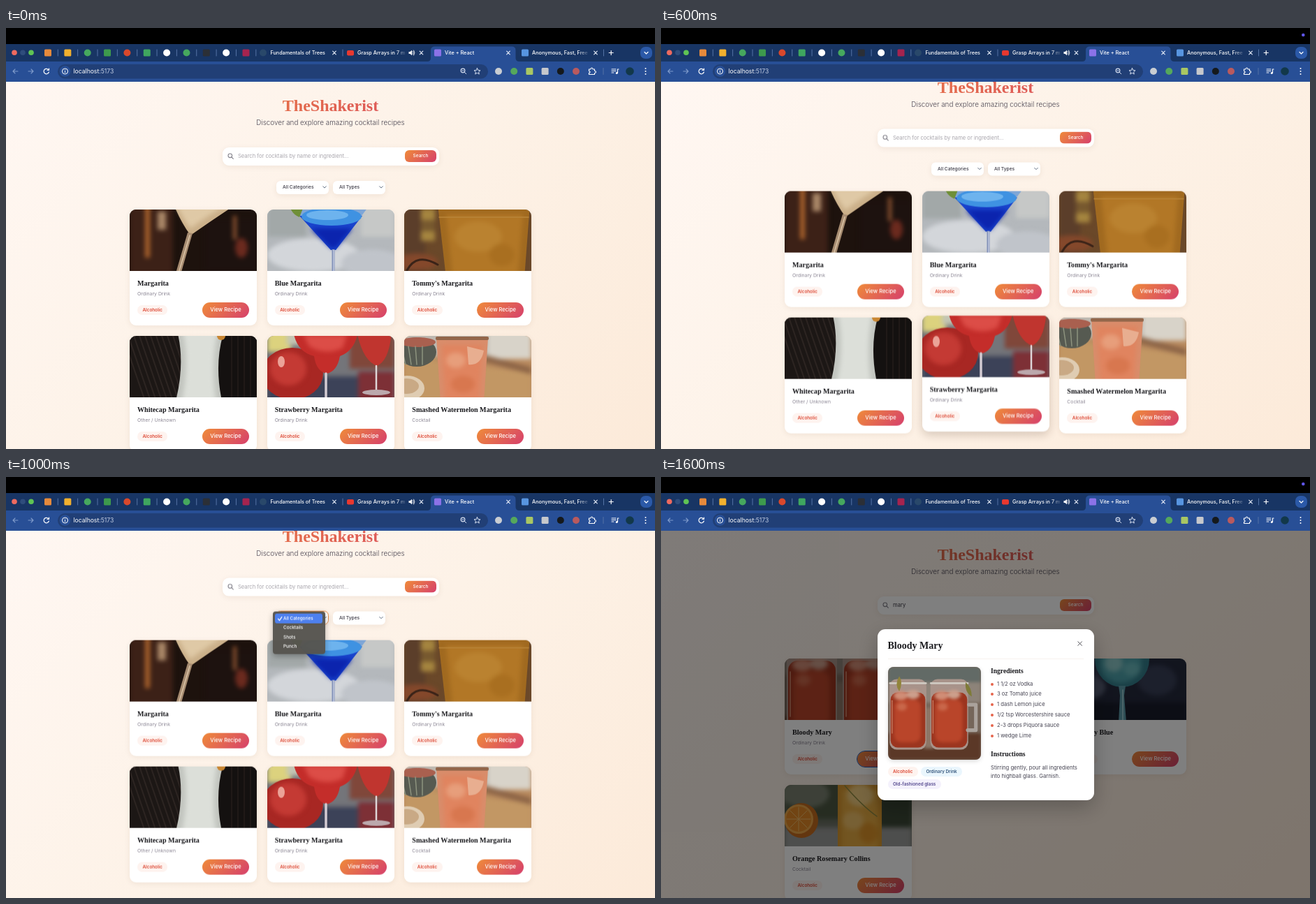
Recreate the animation shown at these times as an HTML page. Size 929 by 603 pixels, loop 1800 ms.

```html
<!DOCTYPE html>
<html lang="en">
<head>
<meta charset="utf-8">
<title>Cocktail recipes</title>
<style>
html, body { margin: 0; width: 100%; height: 100%; overflow: hidden; background: #000; }
#stage { position: relative; width: 929px; height: 603px; overflow: hidden; font-family: Inter, sans-serif; }
#stage div { position: absolute; box-sizing: border-box; }
#chrome, #dot { position: absolute; left: 0; top: 0; }
#view { left: 0; top: 77px; width: 929px; height: 526px; overflow: hidden;
  background: linear-gradient(135deg, #fff7f2, #fdf2e7 50%, #fcead9); }
#page, .shade { left: 0; top: -77px; width: 929px; height: 640px; }
#page { animation: scroll 1.8s step-end infinite; }
@keyframes scroll {
  0% { transform: none; }
  33.332% { transform: translateY(-26.4px); }
  77.777%, 100% { transform: none; }
}
.lift { animation: lift 1.8s step-end infinite; }
@keyframes lift {
  0% { transform: none; box-shadow: 0 2px 8px rgba(90, 50, 20, .08); }
  33.332% { transform: translateY(-2.6px); box-shadow: 0 5px 14px rgba(60, 30, 10, .2); }
  44.443%, 100% { transform: none; box-shadow: 0 2px 8px rgba(90, 50, 20, .08); }
}
.shade { background: rgba(0, 0, 0, .5); }
.t { line-height: 12px; margin-top: -6px; white-space: pre; }
.serif { font-family: "Liberation Serif", serif; font-weight: 700; color: #1a1a1e; }
.mid { left: 0; width: 929px; text-align: center; }
.logo { width: 575px; text-align: center; font-size: 24px; line-height: 32px;
  background: linear-gradient(135deg, #ed8936, #d53f6c); -webkit-background-clip: text;
  background-clip: text; color: transparent; }
.box { background: #fff; box-shadow: 0 2px 8px rgba(90, 50, 20, .08); }
.card { width: 182px; height: 166.4px; border-radius: 9px; }
.card svg { position: absolute; left: 0; top: 0; width: 182px; height: 88.4px; border-radius: 9px 9px 0 0; }
.btn { background: linear-gradient(135deg, #ef8b3a, #d6406c); color: #fff; font-weight: 500; text-align: center; }
.view { left: 104px; top: 133.3px; width: 67px; height: 22px; border-radius: 11px; font-size: 7.55px; line-height: 22px; }
.tag { font-size: 6.3px; font-weight: 600; line-height: 14.2px; height: 14.2px; border-radius: 8px;
  padding: 0 7.5px; white-space: pre; color: #dc4632; background: #fef3ef; }
.tags { left: 15px; top: 197.5px; width: 140px; display: flex; flex-wrap: wrap; gap: 4px; }
#stage .tags .tag { position: static; }
.tags .tag:nth-child(2) { color: #36587e; background: #eaf6fd; }
.tags .tag:nth-child(3) { color: #55498f; background: #f4f1fc; }
.modal { left: 309.5px; width: 310px; border-radius: 11px; background: #fff; box-shadow: 0 10px 30px rgba(0, 0, 0, .25); }
.modal svg { position: absolute; }
.modal .photo { left: 15px; top: 54px; width: 133px; height: 133px; border-radius: 8px; box-shadow: 0 2px 6px rgba(0, 0, 0, .15); }
.body { font-size: 7.65px; color: #474553; }
.bullet { width: 4px; height: 4px; border-radius: 2px; background: #e5654c; }
.ring { border: 1.4px solid #2458b4; }
.menu { width: 75px; background: rgba(86, 84, 79, .97); border-radius: 4px; box-shadow: 0 3px 9px rgba(0, 0, 0, .3); }
.menu .t { font-size: 6.4px; font-weight: 500; color: #fff; }
.pick { left: 3.5px; top: 3.5px; width: 68px; height: 13.5px; border-radius: 3px; background: #4e80ee; }
.soft { filter: blur(3px); }
</style>
</head>
<body>
<div id="stage"></div>
<script>
const STEPS = 9;

// SVG shapes
const rect = (x, y, w, h, fill, rx = 0) => `<rect x="${x}" y="${y}" width="${w}" height="${h}" rx="${rx}" fill="${fill}"/>`;
const oval = (x, y, rx, ry, fill) => `<ellipse cx="${x}" cy="${y}" rx="${rx}" ry="${ry}" fill="${fill}"/>`;
const path = (d, fill) => `<path d="${d}" fill="${fill}"/>`;
const line = (d, stroke, w = 1) => `<path d="${d}" fill="none" stroke="${stroke}" stroke-width="${w}" stroke-linecap="round" stroke-linejoin="round"/>`;
const ringAt = (x, y, r, stroke, w = 1.1) => `<circle cx="${x}" cy="${y}" r="${r}" fill="none" stroke="${stroke}" stroke-width="${w}"/>`;
const soft = (...parts) => `<g class="soft">${parts.join('')}</g>`;
const word = (x, y, s, size, fill = '#fff', weight = 500) =>
  `<text x="${x}" y="${y + size * .36}" font-size="${size}" font-weight="${weight}" fill="${fill}">${s}</text>`;
const series = (n, f) => Array.from({ length: n }, (_, i) => f(i)).join('');

// Photos as simple scenes on a 182 x 182 square
const jar = (x, w) =>
  rect(x, 24, w, 138, '#a8938a', 14) + rect(x + 2, 50, w - 4, 108, '#9c351f', 14) +
  soft(rect(x + 9, 64, w - 20, 84, '#b9452a', 14), oval(x + 22, 56, 14, 9, '#d08d76'),
    oval(x + 46, 54, 13, 9, '#cc9f8c'), oval(x + 24, 78, 10, 8, '#c9674a')) +
  rect(x - 1, 30, w + 2, 4, '#cfcac2', 2) + line(`M${x + 5} 66V130`, '#d08a70', 1.5);

const photos = {
  margarita: () => rect(0, 0, 182, 182, '#1d120d') +
    soft(rect(0, 20, 62, 120, '#3c2117'), rect(22, 36, 7, 80, '#a9622c'), rect(40, 50, 12, 26, '#a98767'),
      rect(108, 60, 74, 76, '#1d120f'), oval(160, 102, 9, 14, '#6b2a1e'), rect(148, 56, 5, 34, '#8c5230'),
      rect(0, 148, 182, 34, '#302822')) +
    path('M52 6Q112 -6 164 32Q124 58 87 84Q64 52 52 6Z', '#cbb08a') +
    soft(path('M60 20Q108 10 148 36Q116 52 87 74Q70 52 60 20Z', '#dfc9a6')) +
    line('M52 6Q112 -6 164 32', '#e6d8c0', 2.5) + path('M83 80L90 81L66 164L59 162Z', '#a88d72') +
    line('M86 84L64 158', '#e0caac', 1.3) + oval(54, 168, 32, 7, '#9c8a76') +
    oval(12, 174, 18, 12, '#d6c64c') + oval(108, 173, 12, 8, '#d8b85a'),
  blue: () => rect(0, 0, 182, 182, '#b4b8bc') +
    soft(rect(0, 30, 56, 56, '#a2a8a8'), rect(134, 30, 48, 56, '#c6c8c7'), oval(66, 112, 66, 24, '#d3d6da'), oval(150, 124, 44, 20, '#c0c4ca')) +
    path('M37 44H144L98 105H91Z', '#7fa6d6') + path('M46 56H136L98 105H91Z', '#1a44cd') +
    soft(path('M62 74H122L98 102H91Z', '#0b24ae')) +
    oval(92, 57, 43, 13, '#3f92e2') + oval(86, 55, 30, 7, '#6db3ee') +
    path('M32 43H52L46 58Q36 54 32 43Z', '#6f8f38') + rect(92.5, 104, 4, 40, '#8190b8') + line('M95 105V140', '#e1e7f3'),
  tommy: () => rect(0, 0, 182, 182, '#6a4829') +
    soft(rect(0, 40, 30, 100, '#5b3e2a'), rect(24, 46, 20, 46, '#a5853f'), rect(24, 62, 20, 16, '#77592f'), oval(18, 122, 30, 12, '#84482b')) +
    path('M48 40H180L172 145H60Z', '#a16a20') +
    soft(path('M60 54H170L162 150H70Z', '#b27726'), oval(106, 86, 34, 22, '#ba8230'), oval(140, 112, 18, 16, '#a96f20')) +
    line('M50 58H178', '#b9853a', 1.5) + line('M4 134Q18 108 48 126', '#3a2318', 3),
  whitecap: () => rect(0, 0, 182, 182, '#1c1715') +
    series(13, i => line(`M${i * 8 - 10} 47L${i * 8 + 22} 140`, '#2d2522', 2)) + rect(128, 40, 54, 100, '#141110') +
    series(5, i => line(`M${146 + i * 9} 47V140`, '#201917', 2)) +
    path('M69 44H134Q121 88 132 140H66Q79 88 69 44Z', '#c3c6c0') +
    soft(path('M76 40H126Q115 90 124 144H74Q87 88 76 40Z', '#dcdfd9')) +
    oval(131, 47, 6, 6, '#c98632'),
  strawberry: () => rect(0, 0, 182, 182, '#74757a') +
    soft(rect(0, 10, 34, 60, '#dcd27e'), rect(28, 20, 66, 40, '#c4c6b4'), rect(118, 10, 64, 84, '#80473a'),
      rect(0, 105, 182, 77, '#3c4258'), rect(130, 98, 52, 50, '#7d3036')) +
    oval(36, 101, 44, 37, '#a82723') + soft(oval(30, 94, 26, 24, '#c43a34')) + oval(20, 84, 5, 8, '#eba398') +
    path('M128 40H178Q175 82 157 90Q136 82 128 40Z', '#c0352f') + line('M156 90V126', '#ded6d8', 2.5) + oval(156, 128, 20, 4, '#bca9ad') +
    path('M37 40H130Q126 68 104 76Q100 98 85 101Q70 98 67 76Q42 70 37 40Z', '#c42d2a') +
    soft(path('M52 46H114L108 64Q84 76 60 62Z', '#dc4d47')) + oval(84, 41, 47, 6, '#dfc5bb') +
    line('M84 101V158', '#d3cbd2', 3.5) + oval(84, 162, 32, 6, '#b7a9b5'),
  melon: () => rect(0, 0, 182, 182, '#b98a5e') +
    soft(rect(0, 30, 182, 46, '#bdb8b0'), rect(120, 30, 62, 50, '#d8d3c9'), path('M0 76L182 100V150H0Z', '#c29764'), path('M114 74L182 92V102L114 84Z', '#8d6547')) +
    oval(18, 70, 28, 21, '#565a51') + oval(19, 56, 26, 7, '#a9604f') + series(4, i => line(`M${i * 10 - 4} 62L${i * 8 + 2} 88`, '#8e947f', 1.5)) +
    oval(4, 122, 25, 18, '#dfccb2') + oval(3, 119, 18, 11, '#c9a985') +
    path('M46 50H120L114 142H52Z', '#d98d6b') +
    soft(path('M54 60H112L107 145H59Z', '#e0845f'), oval(74, 82, 14, 11, '#e79e7b'), oval(84, 116, 17, 12, '#d8774f')) +
    rect(45, 48, 76, 5, '#93664a', 2) + path('M90 62L114 68Q110 90 92 88Z', '#e8ae90'),
  bloody: () => rect(0, 0, 182, 182, '#75665a') +
    soft(rect(0, 0, 182, 56, '#626a66'), rect(0, 30, 182, 40, '#8d8379'), path('M0 130H182V182H0Z', '#5b3827'), rect(70, 80, 20, 80, '#8c7667')) +
    jar(3, 72) + jar(83, 74) + line('M158 74H172V124H156', '#aaa29c', 7) +
    path('M22 18Q30 30 22 48Q12 34 22 18Z', '#91843b') + path('M152 30Q164 40 164 58Q150 50 152 30Z', '#7e7b38'),
  coupe: () => rect(0, 0, 182, 182, '#b6793a') +
    soft(path('M0 40H120L50 90H0Z', '#a5642c'), rect(0, 100, 182, 40, '#c58c4c'), oval(160, 56, 20, 16, '#d9b58a')) +
    path('M28 66Q30 130 96 136Q158 132 166 66Z', '#b6301f') + path('M38 92Q50 128 96 131Q146 128 156 92Z', '#cd4428') +
    oval(97, 71, 69, 19, '#e5cbbb') + oval(97, 75, 60, 15, '#f0ded4') + line('M28 68Q97 40 166 68', '#d7b08c', 2) +
    line('M12 73L158 70', '#5a3825', 2) + line('M10 66Q24 66 26 74Q18 84 8 80', '#5d3221', 4) +
    series(3, i => oval(61 + i * 28, 75, 14, 14, '#1e1416') + oval(57 + i * 28, 69, 4, 3, '#645053')),
  rosemary: () => rect(0, 0, 182, 182, '#252a3d') +
    soft(rect(0, 40, 60, 60, '#3a4158'), oval(38, 88, 28, 18, '#596077'), rect(0, 110, 182, 40, '#181c2a'), oval(140, 78, 28, 22, '#394058'), rect(12, 40, 8, 60, '#20263a')) +
    oval(90, 48, 39, 40, '#347f8d') + soft(oval(88, 54, 30, 28, '#4ea3ac'), oval(78, 54, 13, 12, '#8dc8c8'), oval(104, 62, 12, 10, '#6ab9bd')) +
    path('M85 86H95L93 100L96 138H85L87 100Z', '#5c9caa') + line('M91 92V138', '#a8d5da', 1.5),
  orange: () => rect(0, 0, 182, 182, '#6d7266') +
    soft(rect(0, 30, 182, 66, '#4d5843'), oval(30, 60, 34, 20, '#7a8271'), rect(134, 40, 48, 68, '#3c4937'), rect(0, 108, 182, 40, '#9b9c9a')) +
    oval(24, 98, 24, 25, '#c66c1f') + oval(20, 96, 21, 21, '#eba84a') + oval(20, 96, 18, 18, '#e38a26') +
    series(4, i => {
      const x = 17 * Math.cos(i * Math.PI / 4), y = 17 * Math.sin(i * Math.PI / 4);
      return line(`M${20 - x} ${96 - y}L${20 + x} ${96 + y}`, '#f0bd6d');
    }) +
    rect(76, 40, 63, 100, '#d7972f') +
    soft(rect(82, 54, 51, 90, '#e5aa42'), oval(108, 62, 19, 16, '#f0cc80'), oval(98, 98, 15, 13, '#efc069'), oval(120, 116, 13, 15, '#dd9329')) +
    line('M86 48Q112 78 132 92', '#8f8a40', 1.5)
};
const photo = (name, top, h, cls = '') =>
  `<svg class="${cls}" viewBox="0 ${top} 182 ${h}" preserveAspectRatio="none">${photos[name]()}</svg>`;

// Page parts
const div = (cls, css, body = '', on = '') =>
  `<div class="${cls}" style="${css}"${on && ` data-on="${on}"`}>${body}</div>`;
const text = (x, y, s, cls = '', css = '', on = '') => div('t ' + cls, `left:${x}px;top:${y}px;${css}`, s, on);
const icon = (body, on = '') => `<svg style="position:absolute;left:0;top:0" width="929" height="640"${on && ` data-on="${on}"`}>${body}</svg>`;

const card = ([name, title, kind, cls = ''], i) => div('box card ' + cls,
  `left:${177 + i % 3 * 196.65}px;top:${259.6 + Math.floor(i / 3) * 181.2}px`,
  photo(name, 47, 88.4) +
  text(11, 106.5, title, 'serif', 'font-size:10.1px') +
  text(11, 121, kind, '', 'font-size:6.85px;color:#8c8795') +
  div('tag', 'left:11px;top:137.2px', 'Alcoholic') + div('btn view', '', 'View Recipe'));
const grid = (on, list) => div('', 'left:0;top:0', list.map(card).join(''), on);

const select = (x, label) => div('box', `left:${x}px;top:218.5px;width:74.5px;height:19px;border-radius:6px`) +
  text(x + 9, 228, label, '', 'font-size:6.65px;font-weight:500;color:#3c3a45') +
  icon(line(`M${x + 66.7} 226.8l2.3 2.3l2.3-2.3`, '#5f6d80', 1));

const menu = (x, on, items) => div('', 'left:0;top:0',
  div('', `left:${x + 4.5}px;top:217.8px;width:75.5px;height:20.4px;border:1.3px solid #e88b42;border-radius:6.5px`) +
  div('menu', `left:${x}px;top:218.6px;height:${items.length * 13.5 + 7}px`,
    div('pick', '') + icon(line('M7.5 10.5l2 2.3l3.3-5', '#fff', 1.2)) +
    items.map((s, i) => text(15.5, 10 + i * 13.5, s)).join('')), on);

function modal(on, name, title, glass, items, lines) {
  const steps = 79 + 14.8 * (items.length - 1) + 26.8;
  const h = Math.max(245, steps + 19.5 + 12 * (lines.length - 1) + 20.5);
  return div('shade', '', div('modal', `top:${340 - h / 2}px;height:${h}px`,
    text(15, 24, title, 'serif', 'font-size:14px') +
    icon(line('M286.8 17.8l5.6 5.6m0-5.6l-5.6 5.6', '#55555c')) +
    div('', 'left:15px;top:42.5px;width:280px;height:1px;background:#f8f2ee') +
    photo(name, 0, 182, 'photo') +
    div('tags', '', ['Alcoholic', 'Ordinary Drink', glass].map(s => div('tag', '', s)).join('')) +
    text(162.5, 60.8, 'Ingredients', 'serif', 'font-size:9.6px') +
    items.map((s, i) => div('bullet', `left:162.5px;top:${77 + i * 14.8}px`) + text(171.5, 79 + i * 14.8, s, 'body')).join('') +
    text(162.5, steps, 'Instructions', 'serif', 'font-size:9.6px') +
    lines.map((s, i) => text(162.5, steps + 19.5 + i * 12, s, 'body')).join('')), on);
}

// Browser frame
const mark = (x, y, fill, round) => round ? oval(x, y, 5, 5, fill) : rect(x - 5, y - 5, 10, 10, fill, 1.5);
const tabMarks = [['#e58a3c'], ['#f0b02e'], ['#46a85e', 1], ['#3d9a4d'], ['#d9482c', 1], ['#3fa65f'],
  ['#fff', 1], ['#46a85e', 1], ['#2b2f36'], ['#fff', 1], ['#a5244f']];
const toolMarks = [['#c9cdd2', 1], ['#55a85c', 1], ['#a9c763'], ['#c6c8cc'], ['#15191c', 1], ['#b95a5e', 1]];
const cross = x => line(`M${x - 2.3} 33.2l4.6 4.6m0-4.6l-4.6 4.6`, '#e8eefa', 1.1);
const sep = (x, y = 35.5) => line(`M${x} ${y - 4.5}v9`, '#5573a6');

const chrome = `<svg id="chrome" width="929" height="77" font-family="Inter, sans-serif">
  <defs><linearGradient id="fade"><stop offset=".82" stop-color="#fff"/><stop offset="1" stop-color="#fff" stop-opacity=".15"/></linearGradient></defs>` +
  rect(0, 0, 929, 23, '#000') + rect(0, 23, 929, 26, '#183564') + rect(0, 48, 929, 29, '#284f96') +
  path('M603 48Q608 48 608 43V32Q608 26.5 614 26.5H724Q729.5 26.5 729.5 32V43Q729.5 48 735 48Z', '#284f96') +
  ['#ee6a5f', '#2f4d7c', '#5fc454'].map((c, i) => oval(12 + i * 12, 35.3, 3.8, 3.8, c)).join('') +
  tabMarks.map(([c, round], i) => mark(60 + i * 28.35, 35.5, c, round) + sep(74.3 + i * 28.35)).join('') +
  sep(482) + mark(368, 35.5, '#29486a', 1) + word(378.5, 35.5, 'Fundamentals of Trees', 7.2) + cross(470) +
  rect(488, 32, 10, 7.5, '#e8382f', 2) + word(503, 35.5, 'Grasp Arrays in 7 m', 7.3, 'url(#fade)') +
  path('M576.5 34h2l2.6-2.3v7.6l-2.6-2.3h-2Z', '#fff') + line('M582.5 33.5q1.5 2 0 4M583.7 32q2.6 3.5 0 7', '#fff', .9) + cross(594.5) +
  mark(618, 35.5, '#8b72e8') + word(628, 35.5, 'Vite + React', 7.3) + cross(719) +
  mark(743, 35.5, '#5795e0') + word(753, 35.5, 'Anonymous, Fast, Free', 7.3, 'url(#fade)') + cross(844) +
  sep(855.5) + line('M863.2 35.5h6m-3-3v6', '#fff', 1.2) +
  rect(908, 27, 17, 17, '#2b59a8', 7) + line('M914 34.5l2.5 2.5l2.5-2.5', '#fff', 1.2) +
  line('M17 62h-7m3-3l-3 3l3 3M32 62h7m-3-3l3 3l-3 3', '#7f9bcb', 1.1) +
  line('M61 60.2a3.7 3.7 0 1 0 .4 2.8M61.5 58v2.5h-2.5', '#fff', 1.2) +
  rect(74, 52, 616, 20.5, '#213f76', 10.2) + oval(84.5, 62, 7.8, 7.8, '#284f96') +
  ringAt(84.5, 62, 4, '#fff', 1) + line('M84.5 61.8v2M84.5 60v.1', '#fff') +
  word(96.5, 62, 'localhost<tspan fill="#c3cee4">:5173</tspan>', 8.6, '#fff', 400) +
  ringAt(654, 61, 2.9, '#d5def0') + line('M656.3 63.3l2.5 2.5M652.8 61h2.4', '#d5def0') +
  line('M674.5 57.5l1.3 3l3.2.3l-2.4 2.1l.7 3.2l-2.8-1.7l-2.8 1.7l.7-3.2l-2.4-2.1l3.2-.3Z', '#d5def0', 1) +
  toolMarks.map(([c, round], i) => mark(705 + i * 22.2, 62, c, round)).join('') +
  line('M834.5 59h2.5q0-2 1.5-2t1.5 2h2.5v2.5q2 0 2 1.5t-2 1.5v2h-8v-2.2q1.6 0 1.6-1.3t-1.6-1.3Z', '#fff', 1.1) +
  sep(855, 62) + line('M867 59h6M867 61.5h6M867 64h3M875.5 64.5v-5.5h1.5', '#fff', 1.1) + oval(874.2, 64.6, 1.5, 1.5, '#fff') +
  oval(893, 62, 5.8, 5.8, '#12384a') + series(3, i => oval(915.5, 58 + i * 4, 1, 1, '#fff')) + '</svg>';

const lens = (color, on) => icon(ringAt(320.8, 182.8, 2.8, color) + line('M323 185l2.3 2.3', color, 1.1), on);
const header =
  text(177, 111, 'TheShakerist', 'serif logo', 'margin-top:-16px') +
  text(0, 134.5, 'Discover and explore amazing cocktail recipes', 'mid', 'font-size:9.85px;font-weight:300;color:#4b4753') +
  div('box', 'left:309.5px;top:170.5px;width:310px;height:26px;border-radius:9px') +
  lens('#85838c', '01234568') + lens('#ec8b3b', '7') +
  text(332, 183.5, 'Search for cocktails by name or ingredient...', '', 'font-size:7.6px;color:#aaa7ae', '0123456') +
  text(332, 183.5, 'mary', '', 'font-size:7.6px;color:#3c3a45', '78') +
  div('btn', 'left:571px;top:175.4px;width:45px;height:16.6px;border-radius:6px;font-size:6.5px;line-height:16.6px', 'Search') +
  div('ring', 'left:570.3px;top:174.8px;width:46.4px;height:17.8px;border-radius:6.5px', '', '7') +
  select(387, 'All Categories') + select(468, 'All Types');

const drink = 'Ordinary Drink', mix = 'Cocktail';
const page = '<div id="page">' + header +
  grid('0123456', [['margarita', 'Margarita', drink], ['blue', 'Blue Margarita', drink], ['tommy', "Tommy's Margarita", drink],
    ['whitecap', 'Whitecap Margarita', 'Other / Unknown'], ['strawberry', 'Strawberry Margarita', drink, 'lift'],
    ['melon', 'Smashed Watermelon Margarita', mix]]) +
  grid('78', [['bloody', 'Bloody Mary', drink], ['coupe', 'Mary Tindwell', mix], ['rosemary', 'Rosemary Blue', mix],
    ['orange', 'Orange Rosemary Collins', mix]]) +
  div('ring', 'left:280.3px;top:392.3px;width:68.4px;height:23.4px;border-radius:12px', '', '128') +
  menu(381.5, '5', ['All Categories', 'Cocktails', 'Shots', 'Punch']) +
  menu(462.5, '6', ['All Types', 'Alcoholic', 'Non Alcoholic']) + '</div>';

const modals =
  modal('12', 'margarita', 'Margarita', 'Cocktail glass',
    ['1 1/2 oz Tequila', '1/2 oz Triple sec', '1 oz Lime juice', 'Salt'],
    ['Rub the rim of the glass with the', 'lime slice to make the salt stick to it.', 'Take care to moisten only the outer',
      'rim and sprinkle the salt on it. The', 'salt should present to the lips of the', 'imbiber and never mix into the',
      'cocktail. Shake the other', 'ingredients with ice, then carefully', 'pour into the glass.']) +
  modal('4', 'strawberry', 'Strawberry Margarita', 'Cocktail glass',
    ['1/2 oz Strawberry schnapps', '1 oz Tequila', '1/2 oz Triple sec', '1 oz Lime juice', '1 oz Strawberries', 'Salt'],
    ['Rub rim of cocktail glass with lime', 'juice and dip rim in salt. Shake', 'schnapps, tequila, triple sec, lime',
      'juice, and strawberries with ice,', 'strain into the salt-rimmed glass,', 'and serve.']) +
  modal('8', 'bloody', 'Bloody Mary', 'Old-fashioned glass',
    ['1 1/2 oz Vodka', '3 oz Tomato juice', '1 dash Lemon juice', '1/2 tsp Worcestershire sauce', '2-3 drops Piquora sauce', '1 wedge Lime'],
    ['Stirring gently, pour all ingredients', 'into highball glass. Garnish.']);

const stage = document.getElementById('stage');
stage.innerHTML = chrome + `<div id="view">${page}${modals}</div>` +
  '<svg id="dot" width="929" height="23" data-on="23468"><circle cx="919.3" cy="10" r="2.3" fill="#5f55ea"/></svg>';

// One stepped keyframe rule per set of visible steps
const rules = new Set();
for (const el of stage.querySelectorAll('[data-on]')) {
  const on = el.dataset.on, shown = i => +on.includes(i);
  rules.add(`@keyframes on${on} {` + series(STEPS, i =>
    `${i ? (i / STEPS * 100 - .001).toFixed(3) : 0}% { opacity: ${shown(i)}; }`) + `100% { opacity: ${shown(0)}; }}` +
    `[data-on="${on}"] { animation: on${on} 1.8s step-end infinite; }`);
}
document.head.insertAdjacentHTML('beforeend', `<style>${[...rules].join('\n')}</style>`);
</script>
</body>
</html>
```
